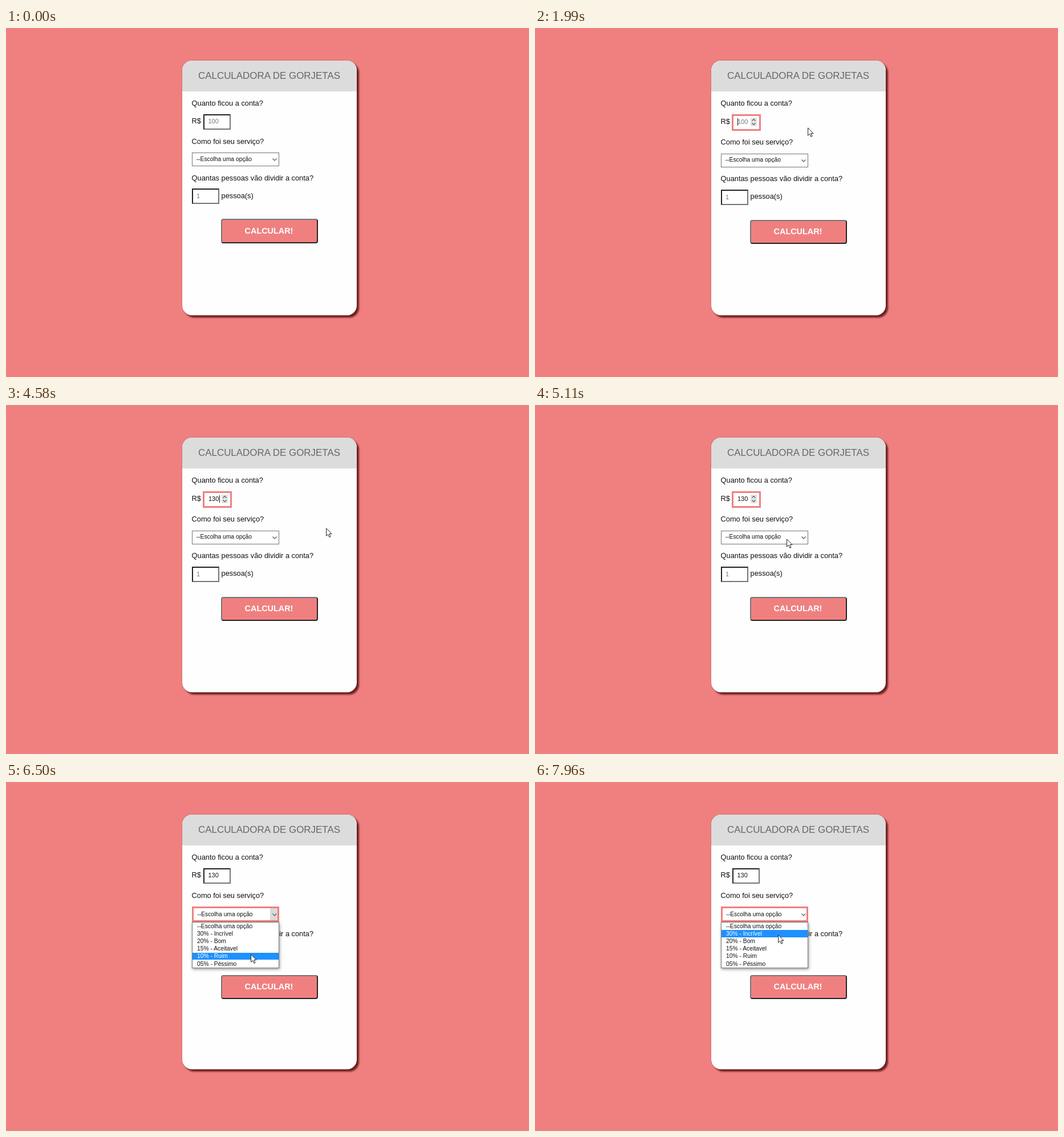
Animation of 917x611 px, one loop 8000 ms. Source, as an HTML page:

```html
<!DOCTYPE html>
<html lang="pt">
<head>
<meta charset="utf-8">
<title>Calculadora de gorjetas</title>
<style>
  html, body { margin: 0; width: 917px; height: 611px; overflow: hidden; }
  body { position: relative; background: #f08080; font: 12.8px/0 "Liberation Sans", Arial, sans-serif; color: #111; }
  div, span, svg { position: absolute; box-sizing: border-box; white-space: nowrap; }
  #card { left: 309px; top: 57px; width: 306px; height: 446px; border-radius: 17px; background: #fefefe;
    box-shadow: 4px 4px 3px rgba(70, 0, 0, .75), 0 0 1.5px rgba(90, 20, 20, .7); }
  #head { width: 306px; height: 54px; border-radius: 17px 17px 0 0; background: #dcdcdc; }
  #title { left: 461.5px; top: 84.1px; font-size: 16.95px; color: #666; transform: translateX(-50%); }
  .q { left: 325.6px; }
  .field { width: 48px; height: 27px; border: 2px solid; border-color: #222 #767676 #767676 #222; background: #fff; }
  .num { font-size: 11px; color: #777; }
  #bill { left: 346px; top: 151px; }
  #bill.on { left: 345px; width: 51px; height: 29px; border: 3px solid #f08080; }
  #caret { top: 158px; width: 1px; height: 13px; background: #111; }
  #spin { left: 378px; top: 157px; }
  #pick { left: 326px; top: 218px; width: 153px; height: 24px; border: 1px solid #767676; background: #fff; }
  #pick.on { height: 27px; border: 3px solid #f08080; }
  #chosen, .opt { font-size: 10.3px; }
  #arrowBg { left: 463px; top: 221px; width: 13px; height: 21px; background: #dadada; }
  #people { left: 326px; top: 281.4px; }
  #go { left: 377px; top: 334.4px; width: 170px; height: 42.4px; border: 2px solid; border-radius: 4px;
    border-color: #767676 #222 #222 #767676; background: #f08080; }
  #goText { left: 418.6px; top: 354.6px; font-size: 14.4px; font-weight: bold; color: #fff; }
  #menu { left: 326px; top: 245px; width: 153px; height: 81px; border: 1px solid #767676; background: #fff;
    box-shadow: 1px 2px 5px rgba(0, 0, 0, .4); }
  .row { left: 0; width: 151px; height: 12.6px; }
  .opt { left: 8px; top: 6.6px; }
  .row.hot { background: #1e90ff; color: #fff; }
</style>
</head>
<body>
<div id="card"><div id="head"></div></div>
<span id="title">CALCULADORA DE GORJETAS</span>

<span class="q" style="top:131.6px">Quanto ficou a conta?</span>
<span class="q" id="money">R$</span>
<div class="field" id="bill"></div>
<span class="num" id="amount"></span>
<svg id="spin" width="11" height="15" fill="none" stroke="#555" stroke-width="1.2">
  <path d="M0 0H11V15H0Z" fill="#e2e2e2" stroke="none"/>
  <path d="M2.5 5.5L5.5 2.5L8.5 5.5M2.5 9.5L5.5 12.5L8.5 9.5"/>
</svg>
<div id="caret"></div>

<div id="service">
  <span class="q" style="top:198.6px">Como foi seu serviço?</span>
  <div id="pick"></div>
  <div id="arrowBg"></div>
  <span id="chosen">--Escolha uma opção</span>
  <svg id="chevron" style="left:466px" width="10" height="7" fill="none" stroke="#666" stroke-width="1.4">
    <path d="M1.5 1.5L5 5L8.5 1.5"/>
  </svg>
</div>

<div id="rest">
  <span class="q" style="top:262.6px">Quantas pessoas vão dividir a conta?</span>
  <div class="field" id="people"></div>
  <span class="num" style="left:334px;top:294.2px">1</span>
  <span style="left:377.6px;top:293.6px">pessoa(s)</span>
  <div id="go"></div>
  <span id="goText">CALCULAR!</span>
</div>

<div id="menu"></div>
<svg id="mouse" style="left:0;top:0" width="13" height="20">
  <path d="M.6 .8V14.2L3.7 11.4L5.9 16.4L8 15.4L5.9 10.6H10Z" fill="#fff" stroke="#222"/>
</svg>

<script>
const LOOP = 8000, START = 330, TICK = 66.35, BLINK = 530;
const FOCUS = 1720, PICK = 5310, OPEN = 5440;
const KEYS = [3190, 3260, 3520], ENTRY = "130", ROW = 13.2;
const $ = id => document.getElementById(id);
const show = (id, on) => { $(id).style.visibility = on ? "visible" : "hidden"; };
const place = (id, prop, v) => { $(id).style[prop] = v + "px"; };

// Each move starts where the previous one ended; the first one swings round a bend
const moves = [
  { from: START, to: 1080, x: 358, y: 218, bend: [672, 190] },
  { from: 1080, to: 1260, x: 404, y: 183 },
  { from: 1260, to: FOCUS, x: 372, y: 163 },
  { from: 1790, to: 2390, x: 692, y: 195 },
  { from: 4000, to: 5110, x: 440, y: 234 },
  { from: 5918, to: 6715, x: 425, y: 326 },
  { from: 7030, to: 7950, x: 426, y: 267 }
];

const options = ["--Escolha uma opção", "30% - Incrível", "20% - Bom", "15% - Aceitavel", "10% - Ruim", "05% - Péssimo"];
const rows = options.map((label, i) => {
  const row = document.createElement("div");
  row.className = "row";
  row.style.top = i * ROW + "px";
  row.innerHTML = `<span class="opt">${label}</span>`;
  return $("menu").appendChild(row);
});

function pointer(t) {
  let x = 859, y = 603;
  for (const m of moves) {
    if (t < m.from) break;
    const u = Math.min(1, (t - m.from) / (m.to - m.from));
    const [bx, by] = m.bend || [(x + m.x) / 2, (y + m.y) / 2];
    const curve = (a, b, c) => a * (1 - u) ** 2 + 2 * b * u * (1 - u) + c * u * u;
    [x, y] = [curve(x, bx, m.x), curve(y, by, m.y)];
  }
  return [Math.round(x), Math.round(y)];
}

function draw(t) {
  const typing = t >= FOCUS && t < PICK, picking = t >= PICK;

  const [x, y] = pointer(START + Math.floor((t - START + 3) / TICK) * TICK);
  show("mouse", t >= START);
  $("mouse").style.transform = `translate(${x}px,${y}px)`;

  const pressed = KEYS.filter(k => t >= k), count = pressed.length;
  $("amount").textContent = ENTRY.slice(0, count) || "100";
  $("amount").style.color = count ? "#111" : "#777";
  place("amount", "left", typing ? 355 : 354.4);
  place("amount", "top", typing ? 164.2 : 163.2);
  place("money", "top", typing ? 163.6 : 162.6);
  $("bill").classList.toggle("on", typing);
  show("spin", typing);

  // Blinking restarts with every key
  const since = pressed[count - 1] || FOCUS;
  show("caret", typing && Math.floor((t - since) / BLINK) % 2 === 0);
  place("caret", "left", Math.round(355 + count * 6.3));

  // A focused control grows and pushes what is below it
  place("service", "top", typing ? 1.6 : 0);
  place("rest", "top", typing ? 1.6 : picking ? 3.2 : 0);

  $("pick").classList.toggle("on", picking);
  show("arrowBg", picking && t < 6570);
  place("chosen", "left", picking ? 335.3 : 333.7);
  place("chosen", "top", picking ? 231.5 : 229.5);
  place("chevron", "top", picking ? 229 : 227);

  show("menu", t >= OPEN);
  const hot = Math.max(0, Math.min(rows.length - 1, Math.floor((y - 246) / ROW)));
  rows.forEach((row, i) => row.classList.toggle("hot", i === hot));
}

const begin = performance.now();
function frame() {
  draw((performance.now() - begin) % LOOP);
  requestAnimationFrame(frame);
}
draw(0);
requestAnimationFrame(frame);
</script>
</body>
</html>
```
